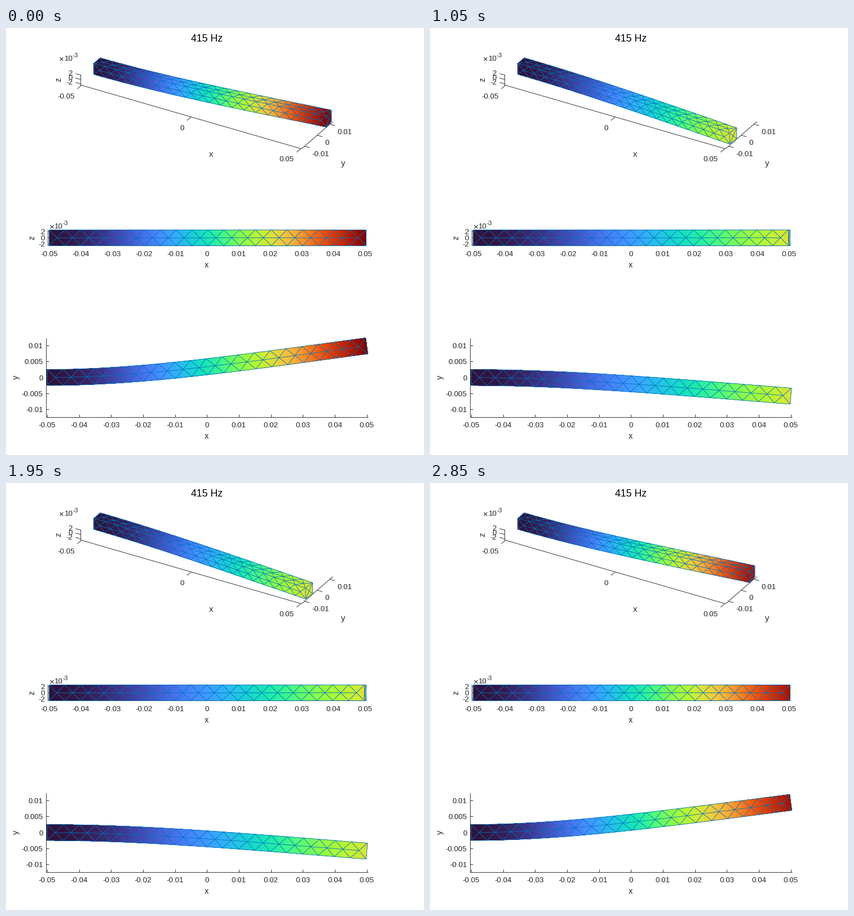
A matplotlib script for the animation above (3 s loop, 741 px wide and 756 px high).

```python
import numpy as np
import matplotlib.pyplot as plt
from matplotlib.animation import FuncAnimation
from matplotlib.collections import LineCollection, PolyCollection

W, H, DPI = 741, 756, 64
PX = 72 / DPI                      # points per pixel
FRAMES, INTERVAL = 20, 150

LENGTH, HALF, AMP = 0.1, 0.0025, 0.0099
CELLS, STRIPS = 20, 240
X_LIM, Y_LIM = 0.05034, 0.0124
INK, EDGE = "#262626", (0, 0.447, 0.741)
TURBO = plt.get_cmap("turbo")

plt.rcParams["font.family"] = "Liberation Sans"
fig = plt.figure(figsize=(W / DPI, H / DPI), dpi=DPI, facecolor="white")
ax = fig.add_axes([0, 0, 1, 1])
ax.set(xlim=(0, W), ylim=(H, 0))
ax.axis("off")


# ---- beam mechanics: first bending mode of a cantilever ----
K, SIGMA = 1.8751, 0.7341


def mode(s):
    q = K * s
    return (np.cosh(q) - np.cos(q) - SIGMA * (np.sinh(q) - np.sin(q))) / 2


def slope(s):
    q = K * s
    return K / LENGTH * (np.sinh(q) + np.sin(q) - SIGMA * (np.cosh(q) - np.cos(q))) / 2


def bend(s, y, z, swing):
    a = AMP * swing
    return (s - 0.5) * LENGTH - y * a * slope(s), y + a * mode(s), z


# ---- projections to pixels ----
def iso(x, y, z):
    return 356 + 3888 * x + 2245 * y, 123.6 + 1122 * x - 1944 * y - 3888 * z


def side(x, y, z):
    return 356.3 + 5602 * x, 371.2 - 5602 * z + 0 * x


def top(x, y, z):
    return 356.3 + 5668 * x, 618.8 - 5668 * y + 0 * x


# ---- faces in (u, v): u along the beam or across its end, v in [-1, 1] ----
def front_face(u, v):
    return u, -HALF + 0 * u, HALF * v


def top_face(u, v):
    return u, HALF * v, HALF + 0 * u


def end_face(u, v):
    return 1 + 0 * u, HALF * (2 * u - 1), HALF * v


def long_mesh():
    nodes = np.arange(CELLS + 1) / CELLS
    mids = (np.arange(CELLS) + 0.5) / CELLS
    zig = np.arange(2 * CELLS + 1)
    paths = [(mids, 0 * mids)]
    for v in (-1, 1):
        paths.append((zig / (2 * CELLS), v * (zig % 2 == 0)))
        paths.append((nodes, v + 0 * nodes))
    for u in (0, 1):
        paths.append((np.array([u, u]), np.array([-1, 1])))
    return paths


LONG_MESH = long_mesh()
END_MESH = [(np.array(u), np.array(v)) for u, v in (
    ([0, 1, 1, 0, 0], [-1, -1, 1, 1, -1]),
    ([0, 1], [-1, 1]),
    ([0, 1], [1, -1]),
)]


class Face:
    def __init__(self, face, view, order):
        self.face, self.view = face, view
        self.mesh = END_MESH if face is end_face else LONG_MESH
        self.fill = PolyCollection([], linewidths=0, antialiaseds=False, zorder=order)
        self.lines = LineCollection([], colors=[EDGE], linewidths=0.85 * PX,
                                    zorder=order + 0.5)
        ax.add_collection(self.fill, autolim=False)
        ax.add_collection(self.lines, autolim=False)

    def place(self, u, v, swing):
        pts = self.view(*bend(*self.face(u, v), swing))
        return np.stack(np.broadcast_arrays(*pts), axis=-1)

    def update(self, swing):
        n = 1 if self.face is end_face else STRIPS
        u = np.linspace(0, 1, n + 1)
        low, high = (self.place(u, v + 0 * u, swing) for v in (-1, 1))
        # strips overlap by one so that no seams show
        far = np.minimum(np.arange(n) + 2, n)
        quads = np.stack([low[:-1], low[far], high[far], high[:-1]], axis=1)
        s = self.face(u[:-1] + 0.5 / n, 0 * u[:-1])[0]
        self.fill.set_verts(quads)
        self.fill.set_facecolor(TURBO(abs(swing) * mode(s)))
        self.lines.set_segments([self.place(u, v, swing) for u, v in self.mesh])


# ---- axes and labels ----
def line(p, q):
    ax.plot([p[0], q[0]], [p[1], q[1]], color=INK, lw=0.9 * PX,
            solid_capstyle="butt", zorder=1)


def label(x, y, text, size=13.33, ha="center", color=INK):
    ax.text(x, y + 0.36 * size, text, size=size * PX, ha=ha,
            va="baseline", color=color, zorder=20)


def turned(x, y, text):
    ax.text(x, y, text, size=14.67 * PX, ha="center", va="center",
            rotation=90, color=INK, zorder=20)


def exponent(x, y):
    label(x + 5, y + 1, "×", 15)
    label(x + 10, y, "10", ha="left")
    label(x + 25, y - 4.5, "-3", 10.67, ha="left")


def tick_text(v):
    return f"{v:.3f}".rstrip("0").rstrip(".")


def iso_axes():
    corner = iso(X_LIM, -Y_LIM, -HALF)
    base = iso(-X_LIM, -Y_LIM, -HALF)
    line(base, corner)
    line(corner, iso(X_LIM, Y_LIM, -HALF))
    line(base, iso(-X_LIM, -Y_LIM, HALF))

    def tick(p, dx, dy):
        line(p, (p[0] + dx, p[1] + dy))

    for v, x, y in ((-0.05, 107, 120), (0, 312, 176), (0.05, 497.5, 231.5)):
        tick(iso(v, -Y_LIM, -HALF), -7.3, 6.3)
        label(x, y, tick_text(v))
    for v, x, y in ((-0.01, 558, 222), (0, 569, 202), (0.01, 600, 183)):
        tick(iso(X_LIM, v, -HALF), 9.2, 2.7)
        label(x, y, tick_text(v))
    for v, y in ((-2, 95.5), (0, 87.5), (2, 79.5)):
        tick(iso(-X_LIM, -Y_LIM, v / 1000), -9.2, -2.7)
        label(118, y, str(v), ha="right")
    label(364, 222.5, "x", 14.67)
    label(597.5, 238.5, "y", 14.67)
    turned(93.5, 91.5, "z")
    exponent(93.5, 53)


def flat_axes(view, low, high, ticks, text_y, name):
    """Axes of a straight-on view; ticks holds (point, label) pairs."""
    x0, y0 = view(-X_LIM, low[0], low[1])
    x1, y1 = view(X_LIM, high[0], high[1])
    line((x0, y0), (x1, y0))
    line((x0, y0), (x0, y1))
    for i in range(-5, 6):
        x = view(i / 100, 0, 0)[0]
        line((x, y0), (x, y0 - 5.5))
        label(x, text_y, tick_text(i / 100))
    for point, text in ticks:
        y = view(*point)[1]
        line((x0, y), (x0 + 5.5, y))
        label(x0 - 5.5, y, text, ha="right")
    label(356, text_y + 19, "x", 14.67)
    turned(x0 - (28 if name == "z" else 53), view(0, 0, 0)[1], name)


label(356, 18, "415 Hz", 17.6, color="black")
iso_axes()
flat_axes(side, (0, -HALF), (0, HALF),
          [((0, 0, v / 1000), str(v)) for v in (-2, 0, 2)], 399.5, "z")
exponent(76, 350)
flat_axes(top, (-Y_LIM, 0), (Y_LIM, 0),
          [((0, v / 200, 0), tick_text(v / 200)) for v in range(-2, 3)], 702.5, "y")

faces = [
    Face(top_face, iso, 4), Face(front_face, iso, 5), Face(end_face, iso, 6),
    Face(end_face, side, 4), Face(front_face, side, 5),
    Face(top_face, top, 4),
]


def draw(frame):
    swing = np.cos(2 * np.pi * frame / FRAMES)
    for face in faces:
        face.update(swing)
    return []


anim = FuncAnimation(fig, draw, frames=FRAMES, interval=INTERVAL,
                     repeat=True, repeat_delay=0, blit=False)
plt.show()
```
